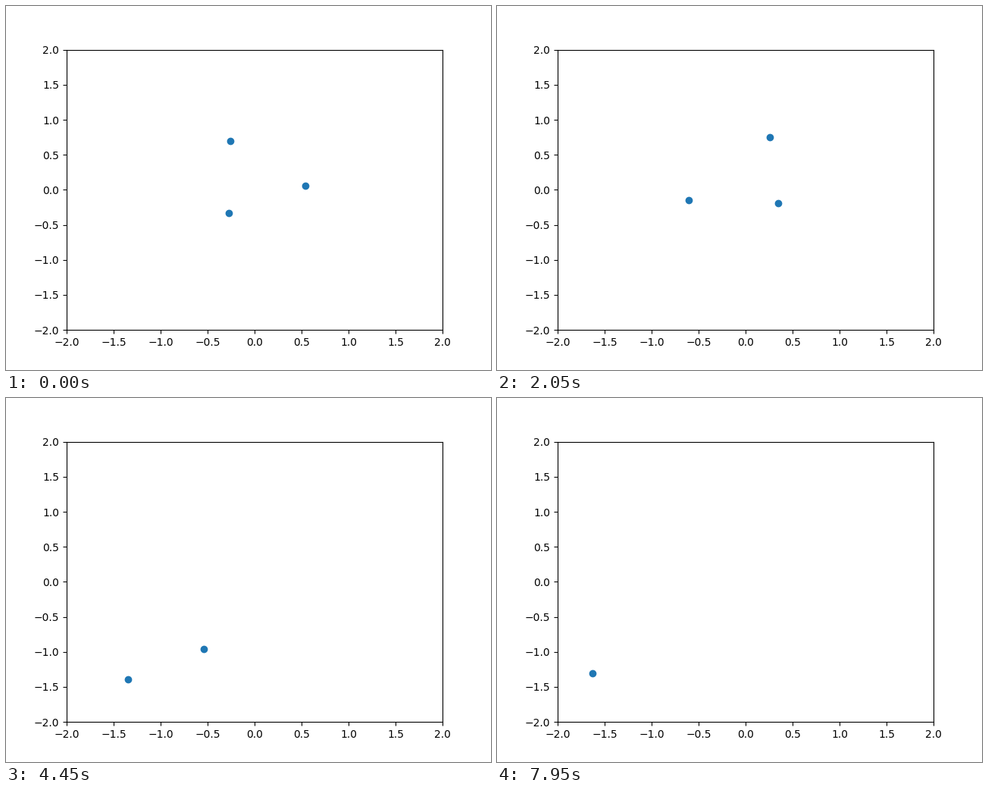
These frames come from a looping animation (640x480 px, 8 s). A matplotlib script:

```python
import numpy as np
import matplotlib.pyplot as plt
from matplotlib.animation import FuncAnimation

FRAMES, INTERVAL = 160, 50
SUB = 8                              # integration steps per frame
DT = INTERVAL / 1000 / SUB
SCALE = np.array([124.0, -92.4])     # stage pixels per data unit
ORIGIN = np.array([328.0, 242.4])
CENTRE = np.array([0.002, 0.139])    # resting centre of mass
GRAVITY = 0.25                       # first guess, refined by the fit
ENCOUNTER, START = 60, 64            # frames: close pass, first pose after it

# A few key poses by frame, in stage pixels. A close pass splits the motion.
BOUND = {0: [(395, 237), (297, 178), (294, 273)],
         18: [(322, 191), (332, 208), (330, 290)],
         41: [(253, 256), (360, 173), (371, 260)],
         51: [(249, 283)]}
FLUNG = {START: [(255, 312), (333, 214), (397, 163)],
         89: [(261, 331), (161, 371)],
         109: [(226, 337)],
         159: [(126, 363)]}


def pull(pos, mu):
    """Mutual attraction of three equal masses, for a batch of systems."""
    d = pos[:, None, :, :] - pos[:, :, None, :]
    r2 = (d * d).sum(-1) + np.eye(3)
    return mu * (d / (r2 * np.sqrt(r2))[..., None]).sum(2)


def integrate(params, frames, h=DT):
    """Leapfrog paths, indexed by frame, system, body and axis.

    Two bodies are free; the third keeps the centre of mass at rest.
    """
    two = params[:, :8].reshape(-1, 2, 2, 2)
    mu = params[:, 8, None, None]
    last = np.array([3 * CENTRE, (0, 0)]) - two.sum(2)
    pos, vel = np.concatenate([two, last[:, :, None]], 2).swapaxes(0, 1)
    path = [pos]
    acc = pull(pos, mu)
    for _ in range(frames * SUB):
        vel = vel + acc * h / 2
        pos = pos + vel * h
        acc = pull(pos, mu)
        vel = vel + acc * h / 2
        path.append(pos)
    return np.array(path[::SUB])


def fit(poses, vel, rounds=28):
    """Levenberg-Marquardt search for the orbit through the key poses."""
    start = min(poses)
    frame, body, spot = zip(*[(f - start, b, p) for f, pose in poses.items()
                              for b, p in enumerate(pose)])
    frame, body, spot = np.array(frame), np.array(body), np.array(spot)
    first = (spot[:2] - ORIGIN) / SCALE
    trial = np.concatenate([first.ravel(), np.ravel(vel), [GRAVITY]])
    eps, cost, damp = 1e-6, np.inf, 1e-2
    for _ in range(rounds):
        batch = trial + eps * np.vstack([np.zeros(9), np.eye(9)])
        seen = integrate(batch, frame.max())[frame, :, body] * SCALE + ORIGIN
        res = (seen - spot[:, None]).swapaxes(0, 1).reshape(10, -1)
        if res[0] @ res[0] < cost:
            best, cost = trial, res[0] @ res[0]
            jac = ((res[1:] - res[0]) / eps).T
            grad, hess = jac.T @ res[0], jac.T @ jac
            damp /= 4
        else:
            damp *= 5
        trial = best - np.linalg.solve(hess + damp * np.diag(np.diag(hess)), grad)
    return best[None]


bound = fit(BOUND, [(-0.27, 0.595), (0.03, -0.205)])
flung = fit(FLUNG, [(0.08, -0.47), (-1.21, -1.1)])
paths = np.concatenate([
    integrate(bound, ENCOUNTER - 1),
    integrate(flung, START - ENCOUNTER, -DT)[:0:-1],
    integrate(flung, FRAMES - 1 - START),
])[:, 0]

fig, ax = plt.subplots(figsize=(6.4, 4.8), dpi=100)
ax.set_xlim(-2, 2)
ax.set_ylim(-2, 2)
dots, = ax.plot([], [], "o")


def draw(i):
    dots.set_data(paths[i, :, 0], paths[i, :, 1])
    return dots,


anim = FuncAnimation(fig, draw, frames=FRAMES, interval=INTERVAL,
                     repeat=True, repeat_delay=0)
plt.show()
```
